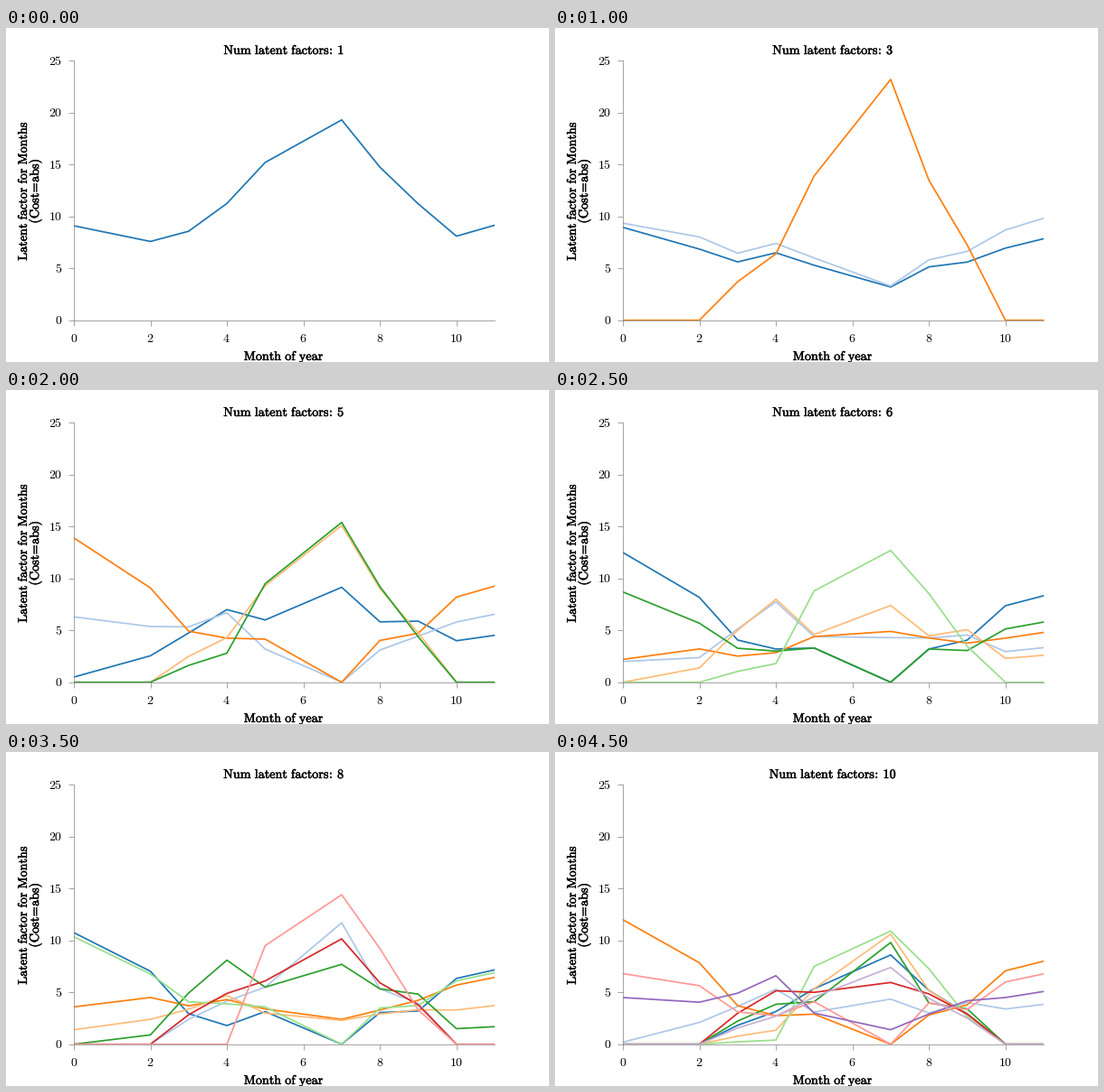
A matplotlib script that plays this animation: 600x370 px, repeating every 5000 ms.

```python
import matplotlib.pyplot as plt
from matplotlib.animation import FuncAnimation
from matplotlib.patheffects import withStroke

W, H, DPI = 600, 370, 100
LEFT, BOTTOM, AX_W, AX_H = 75, 323.75, 465, 287.5
COLORS = ["#1f77b4", "#aec7e8", "#ff7f0e", "#ffbb78", "#2ca02c",
          "#98df8a", "#d62728", "#ff9896", "#9467bd", "#c5b0d5"]
plt.rcParams["mathtext.fontset"] = "cm"


def curve(jan, may, jun, aug, nov):
    """Fill in a year from five key months; September mirrors June."""
    mar = .3 * jan + .6 * nov
    feb = (jan + mar) / 2
    apr = .27 * mar + .58 * may
    jul = (jun + aug) / 2
    sep = .97 * jun
    octo = .23 * aug + .3 * may + .42 * nov
    dec = 1.13 * nov
    return [jan, feb, mar, apr, may, jun, jul, aug, sep, octo, nov, dec]


def summer(may, jun, aug):
    """A hump that is zero in the cold months."""
    return curve(0, may, jun, aug, 0)


def winter(jan, may, jun):
    """A slope that reaches zero in August and recovers."""
    return curve(jan, may, jun, 0, .59 * jan)


one = [curve(9.1, 11.25, 15.2, 19.3, 8.1)]
three = [curve(8.95, 6.5, 5.3, 3.2, 6.95), curve(9.35, 7.4, 6, 3.3, 8.7),
         summer(6.4, 13.9, 23.2)]
five = [curve(.5, 7, 6, 9.15, 4), curve(6.3, 6.7, 3.2, 0, 5.8),
        winter(13.9, 4.25, 4.15), summer(4.3, 9.3, 15.1),
        summer(2.8, 9.5, 15.4)]
seven = [summer(3.45, 9.05, 16.5), winter(12.5, 3.2, 3.3),
         curve(2, 7.75, 4.4, 4.3, 2.95), curve(2.2, 2.85, 4.4, 4.9, 4.25),
         curve(0, 8, 4.6, 7.4, 2.3), winter(8.7, 3, 3.3),
         summer(1.8, 8.8, 12.7)]
eight = [winter(10.75, 1.8, 3.15), summer(4.15, 5.5, 11.7),
         curve(3.6, 4.3, 3.4, 2.4, 5.7), curve(1.4, 4.7, 3, 2.3, 3.3),
         curve(0, 8.1, 5.5, 7.7, 1.5), winter(10.35, 3.9, 3.6),
         summer(4.9, 6.1, 10.15), summer(0, 9.5, 14.4)]
nine = [curve(3.2, 4.3, 3.55, 2.65, 4.3), summer(0, 9.4, 14.5),
        curve(0, 7.95, 3.9, 7.45, 2.5), curve(5.2, 2.85, 2.6, 0, 4.1),
        summer(3.1, 5.8, 11.3), curve(1, 3.3, 2.5, 4.4, 2.45),
        summer(5.4, 6.3, 9.55), winter(12.4, 1.4, 2.4),
        curve(5.8, 5.15, 4.6, 0, 4.1)]
ten = [summer(3.15, 5.35, 8.6), curve(.2, 5.3, 3.1, 4.35, 3.4),
       winter(12, 2.75, 2.9), summer(1.35, 5.35, 10.6),
       summer(3.85, 4.1, 9.8), summer(.4, 7.5, 10.9),
       summer(5.15, 5, 5.95), curve(6.8, 2.75, 4.1, 0, 6),
       curve(4.5, 6.6, 3, 1.4, 4.5), summer(2.7, 4.55, 7.4)]

charts = [one, three[1:], three, five[1:], five, seven[1:],
          seven, eight, nine, ten]

fig = plt.figure(figsize=(W / DPI, H / DPI), dpi=DPI, facecolor="white")
ax = fig.add_axes([LEFT / W, 1 - BOTTOM / H, AX_W / W, AX_H / H])
ax.set(xlim=(0, 11), ylim=(0, 25), xticks=range(0, 11, 2),
       yticks=range(0, 26, 5))
ax.tick_params(length=4, width=.5, color="gray",
               labelbottom=False, labelleft=False)
for side, spine in ax.spines.items():
    spine.set(visible=side in ("left", "bottom"), color="gray", linewidth=.5)


def roman(text):
    """Set text in Computer Modern with ordinary word spacing."""
    text = text.replace(": ", r"\!:\>").replace("=", r"\!=\!")
    return r"$\mathrm{" + text.replace(" ", r"\ ") + "}$"


def label(x, y, text, **style):
    """Place text with its baseline at pixel (x, y) from the top left."""
    style = {"fontsize": 10, "ha": "center", **style}
    return fig.text(x / W, 1 - y / H, roman(text), va="baseline",
                    rotation_mode="anchor", **style)


def heading(x, y, text, rotation=0):
    """A slightly larger, heavier label."""
    return label(x, y, text, rotation=rotation, fontsize=10.2,
                 path_effects=[withStroke(linewidth=.35, foreground="black")])


for month in range(0, 11, 2):
    label(LEFT - .3 + AX_W / 11 * month, 348, str(month))
for value in range(0, 26, 5):
    label(62.5, BOTTOM + 4.4 - AX_H / 25 * value, str(value), ha="right")
heading(307.3, 368, "Month of year")
heading(23, 180.5, "Latent factor for Months", rotation=90)
heading(36, 180.5, "(Cost=abs)", rotation=90)
title = heading(307.3, 29, "")

lines = [ax.plot([], [], color=c, linewidth=1.25)[0] for c in COLORS]


def update(i):
    rows = charts[i]
    title.set_text(roman(f"Num latent factors: {i + 1}"))
    for k, line in enumerate(lines):
        row = rows[k] if k < len(rows) else []
        line.set_data(range(len(row)), row)
    return [title, *lines]


anim = FuncAnimation(fig, update, frames=len(charts), interval=500,
                     repeat=True, repeat_delay=0)
plt.show()
```
